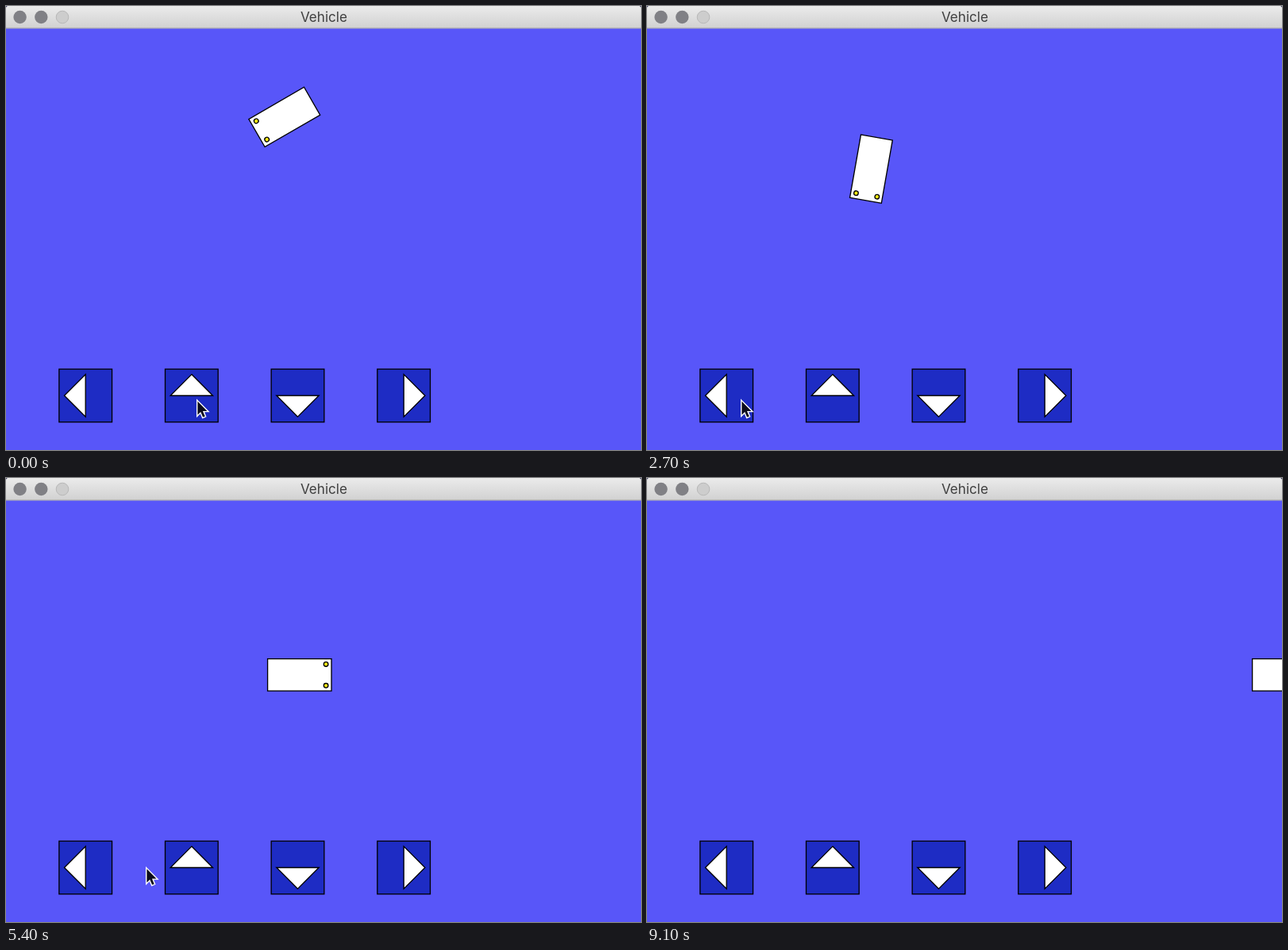
Recreate the animation shown at these times as an HTML page. Size 800x559 px, loop 9200 ms.

```html
<!DOCTYPE html>
<html lang="en">
<head>
<meta charset="utf-8">
<title>Vehicle</title>
<style>
  html, body { margin: 0; width: 100%; height: 100%; overflow: hidden; background: #5856f9; }
  svg { display: block; width: 800px; height: 559px; }
  .ink { stroke: #000; stroke-width: 1.33; }
  .title { font: 17.1px Inter, Roboto, sans-serif; fill: #404040; text-anchor: middle; }
</style>
</head>
<body>
<svg viewBox="0 0 800 559">
  <defs>
    <linearGradient id="bar" x2="0" y2="1">
      <stop offset="0" stop-color="#ebebeb"/>
      <stop offset="1" stop-color="#d1d1d1"/>
    </linearGradient>
    <g id="button" class="ink">
      <rect x="-33.33" y="-33.33" width="66.67" height="66.67" fill="#1e2cc4"/>
      <path d="M-26.67 0 0-26.67V26.67Z" fill="#fff"/>
    </g>
  </defs>

  <rect width="800" height="559" fill="#5856f9"/>
  <g id="buttons"></g>

  <g id="car" class="ink">
    <rect x="-40.2" y="-20.2" width="80.4" height="40.4" fill="#fff"/>
    <g fill="#f7ea14">
      <circle cx="33.3" cy="-13.4" r="2.8"/>
      <circle cx="33.3" cy="13.4" r="2.8"/>
    </g>
  </g>

  <rect width="800" height="4" fill="#1b1b4a"/>
  <path d="M0 28V2.5Q0 0 2.5 0H797.5Q800 0 800 2.5V28Z" fill="url(#bar)"/>
  <rect y="27.2" width="800" height="1.33" fill="#b0b0b4"/>
  <circle cx="17.6" cy="14" r="8.2" fill="#808085"/>
  <circle cx="44.3" cy="14" r="8.2" fill="#808085"/>
  <circle cx="71" cy="14" r="7.8" fill="#cdcdcd" stroke="#b8b8b8"/>
  <text class="title" x="400.4" y="20.3">Vehicle</text>

  <path id="cursor" d="M.7 1.1V21.6L5 17.3 7.7 23.6 11.6 21.9 9 15.6H15Z"
        fill="#0c0c1c" stroke="#fff" stroke-width="1.4"/>
</svg>
<script>
const LOOP = 9200, STEP = 100, STEPS = LOOP / STEP, HIDE = 90;

// Steps at which the left button turns the car by TURN degrees
const TURN = -10;
const clicks = [18, 18, 21, 24, 27, 30, 31, 32, 33, 35, 36, 39, 40, 40, 41];

// Pixels per step, from a given step on
const gears = { 0: 3.3, 18: 4.28, 41: 4.42, 61: 7.1, 68: 10.45, 71: 13.9, 81: 16.95 };

const byId = id => document.getElementById(id);

// Drive the car once to get its pose at every step
const poses = [{ x: 350.8, y: 139.8, heading: 150 }];
for (let n = 1, speed = gears[0]; n < STEPS; n++) {
  speed = gears[n] ?? speed;
  const { x, y, heading: old } = poses[n - 1];
  const heading = old + TURN * clicks.filter(c => c === n).length;
  const a = heading * Math.PI / 180;
  poses.push({ x: x + speed * Math.cos(a), y: y + speed * Math.sin(a), heading });
}

// Eased progress from 0 to 1 between two steps
function glide(n, from, to) {
  const k = Math.min(1, Math.max(0, (n - from) / (to - from)));
  return k * k * (3 - 2 * k);
}

// From the forward button to the left one and back
function pointer(n) {
  const out = glide(n, 4, 13), back = glide(n, 50, 58);
  return [240 - 122 * out + 116 * back, 495 - 11 * back];
}

byId("buttons").innerHTML = [0, 90, -90, 180].map((turn, i) =>
  `<use href="#button" transform="translate(${100.2 + 133.65 * i} 490.5) rotate(${turn})"/>`
).join("");

function draw() {
  const n = Math.floor(performance.now() % LOOP / STEP);
  const { x, y, heading } = poses[n];
  byId("car").setAttribute("transform", `translate(${x} ${y}) rotate(${heading})`);
  byId("cursor").setAttribute("transform", `translate(${pointer(n).join(" ")})`);
  byId("cursor").setAttribute("visibility", n < HIDE ? "visible" : "hidden");
  requestAnimationFrame(draw);
}
draw();
</script>
</body>
</html>
```
